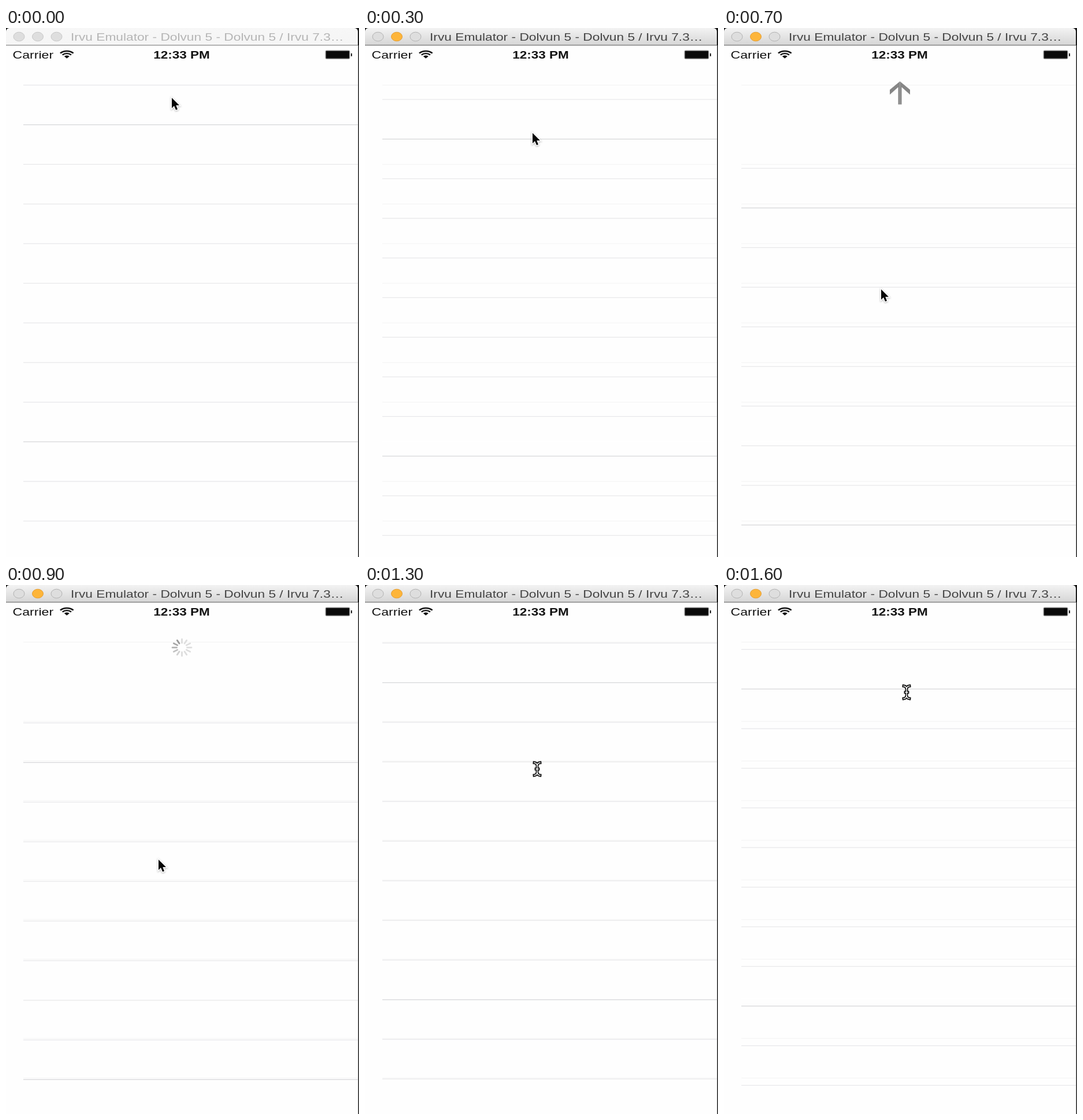
An HTML page with a canvas for the animation above (2100 ms loop, 611x917 px).

```html
<!DOCTYPE html>
<html lang="en">
<head>
<meta charset="utf-8">
<title>Pull to refresh</title>
<style>
  html, body { margin: 0; width: 100%; height: 100%; overflow: hidden; background: #fff; }
  canvas { display: block; }
</style>
</head>
<body>
<canvas id="stage" width="611" height="917"></canvas>
<script>
const ctx = document.getElementById('stage').getContext('2d');
const W = 611, H = 917, EDGE = 609, LOOP = 2100, STEP = 100, LAST_STEP = 16;
const ASPECT = 1.25;             // the whole screen is stretched sideways
const FIRST_ROW = 98.4, ROW = 68.7, GRAB_Y = 121, HELD = 125;
const FOCUS = 100, RELEASE = 900, DONE = 1200;

// The pointer's path: drag down, rest, move back up.
const PATH = [
  { t: 100, x: 287, y: GRAB_Y }, { t: 300, x: 290, y: 182 }, { t: 500, x: 284, y: 304 },
  { t: 700, x: 272, y: 453 }, { t: 1100, x: 256, y: 499 }, { t: 1300, x: 298, y: 319 },
  { t: 1600, x: 316, y: 186 }
];

const ramp = (t, from, to) => Math.min(1, Math.max(0, (t - from) / (to - from)));

function pointerAt(t) {
  const i = Math.max(1, PATH.findIndex(p => p.t >= t));
  const a = PATH[i - 1], b = PATH[i], p = ramp(t, a.t, b.t);
  return { x: a.x + (b.x - a.x) * p, y: a.y + (b.y - a.y) * p };
}

function pullAt(t, pointerY) {
  const dragged = pointerY - GRAB_Y;
  if (t < RELEASE) return dragged * (0.4012 + dragged * 0.0001);
  if (t < DONE) return HELD + 15 * (1 - ramp(t, RELEASE, 1000)) ** 2;
  return 1.6 + 11 * ramp(t, 1300, 1600) ** 2;
}

function rect(x, y, w, h, color) {
  ctx.fillStyle = color;
  ctx.fillRect(x, y, w, h);
}

// Runs a drawing with its own origin and horizontal scale.
function at(x, y, scaleX, draw) {
  ctx.save();
  ctx.translate(x, y);
  ctx.scale(scaleX, 1);
  draw();
  ctx.restore();
}

function text(str, x, y, size, color, weight = 400, align = 'left') {
  at(x, y, ASPECT, () => {
    ctx.font = `${weight} ${size}px "Liberation Sans", Arial, sans-serif`;
    ctx.textAlign = align;
    ctx.fillStyle = color;
    ctx.fillText(str, 0, 0);
  });
}

function polygon(points) {
  ctx.beginPath();
  points.forEach(([x, y]) => ctx.lineTo(x, y));
  ctx.closePath();
}

function rows(top, color, boldColor) {
  for (let i = 0; top + i * ROW < H; i++) {
    rect(30, top + i * ROW, EDGE - 30, 1.2, i % 8 === 1 ? boldColor : color);
  }
}

function pullArrow(y, alpha) {
  at(304.5, y, 1, () => {
    ctx.globalAlpha = alpha;
    ctx.fillStyle = '#868686';
    for (const side of [-1, 1]) {
      polygon([[0, -20], [side * 17.5, -5.5], [side * 17.5, 3], [side * 3, -10],
               [side * 3, 20], [0, 20]]);
      ctx.fill();
    }
  });
}

function spinner(y, t) {
  const lead = Math.round((t - 1100) / 83) + 1;
  at(304.5, y, 1.13, () => {
    ctx.lineWidth = 2.6;
    ctx.lineCap = 'round';
    for (let i = 0; i < 12; i++) {
      const age = (lead - i + 24) % 12;
      const shade = Math.min(222, 152 + age * 14);
      const a = i * Math.PI / 6;
      ctx.strokeStyle = `rgb(${shade},${shade},${shade})`;
      ctx.beginPath();
      ctx.moveTo(Math.sin(a) * 8, -Math.cos(a) * 8);
      ctx.lineTo(Math.sin(a) * 14.5, -Math.cos(a) * 14.5);
      ctx.stroke();
    }
  });
}

function statusBar() {
  text('Carrier', 11.5, 53, 18.5, '#111');
  text('12:33 PM', 304, 53, 18, '#111', 700, 'center');
  at(105.3, 52.8, ASPECT, () => {
    ctx.lineWidth = 2.3;
    ctx.strokeStyle = ctx.fillStyle = '#111';
    for (const r of [12.8, 8.6]) {
      ctx.beginPath();
      ctx.arc(0, 0, r, -Math.PI * 0.75, -Math.PI * 0.25);
      ctx.stroke();
    }
    ctx.beginPath();
    ctx.moveTo(0, 0);
    ctx.arc(0, 0, 5.2, -Math.PI * 0.75, -Math.PI * 0.25);
    ctx.fill();
  });
  ctx.fillStyle = '#8a8a8a';
  ctx.beginPath();
  ctx.roundRect(552.5, 38.5, 43, 15.5, 3);
  ctx.fill();
  rect(554, 40, 40, 12.5, '#0a0a0a');
  rect(597, 44, 2, 5, '#222');
}

function titleBar(active) {
  const fill = ctx.createLinearGradient(0, 0, 0, 30);
  fill.addColorStop(0, active ? '#f3f3f3' : '#f7f7f7');
  fill.addColorStop(1, active ? '#d5d5d5' : '#f5f5f5');
  rect(0, 0, W, 30, '#1c1c1c');
  ctx.fillStyle = fill;
  ctx.beginPath();
  ctx.roundRect(0, 0, EDGE, 30, [6, 6, 0, 0]);
  ctx.fill();
  rect(0, 29, EDGE, 1.5, active ? '#858585' : '#9c9c9c');
  for (let i = 0; i < 3; i++) {
    const amber = active && i === 1;
    ctx.beginPath();
    ctx.ellipse(22.5 + i * 32.5, 15, 9.5, 7.8, 0, 0, 7);
    ctx.fillStyle = amber ? '#fdb53a' : '#dedede';
    ctx.strokeStyle = amber ? '#e3a03a' : active ? '#b3b3b3' : '#c8c8c8';
    ctx.lineWidth = 1;
    ctx.fill();
    ctx.stroke();
  }
  text('Irvu Emulator - Dolvun 5 - Dolvun 5 / Irvu 7.3…', 112, 21.5, 18.2,
       active ? '#444' : '#b5b5b5');
}

function arrowPointer(x, y) {
  at(x, y, 1, () => {
    polygon([[0, 0], [0, 18], [4, 14], [7, 21], [10, 20], [7.3, 13], [13, 13]]);
    ctx.shadowColor = 'rgba(0,0,0,.3)';
    ctx.shadowBlur = 3;
    ctx.shadowOffsetY = 1;
    ctx.lineWidth = 3;
    ctx.strokeStyle = '#fff';
    ctx.stroke();
    ctx.shadowColor = 'transparent';
    ctx.fillStyle = '#050505';
    ctx.fill();
  });
}

function textPointer(x, y) {
  at(x, y, 1, () => {
    ctx.beginPath();
    for (const s of [-1, 1]) {
      ctx.moveTo(-5, s * 11);
      ctx.quadraticCurveTo(0, s * 10.5, 0, s * 5);
      ctx.quadraticCurveTo(0, s * 10.5, 5, s * 11);
    }
    ctx.moveTo(0, -6);
    ctx.lineTo(0, 6);
    ctx.moveTo(-2, 0);
    ctx.lineTo(2, 0);
    ctx.lineCap = 'square';
    for (const [width, color] of [[4.8, '#0a0a0a'], [1.4, '#fff']]) {
      ctx.lineWidth = width;
      ctx.strokeStyle = color;
      ctx.stroke();
    }
  });
}

function draw(t) {
  const { x, y } = pointerAt(t);
  const pull = pullAt(t, y);
  const top = FIRST_ROW + pull;
  const active = t >= FOCUS;
  rect(0, 0, W, H, '#fefefe');
  if (active) rows(FIRST_ROW, '#f5f5f5', '#fefefe');
  rows(top, '#e7e7e9', '#d4d5d7');
  if (t < RELEASE) pullArrow(top - 130, ramp(pull, 35, 130));
  else if (t < DONE) spinner(top - 130, t);
  statusBar();
  rect(EDGE + 0.5, 30, 1.5, H, '#222');
  titleBar(active);
  if (t < 1000) arrowPointer(x, y);
  else textPointer(x, y);
}

const start = performance.now();
function frame() {
  const step = Math.floor((performance.now() - start) % LOOP / STEP);
  draw(Math.min(step, LAST_STEP) * STEP);
  requestAnimationFrame(frame);
}
frame();
</script>
</body>
</html>
```
